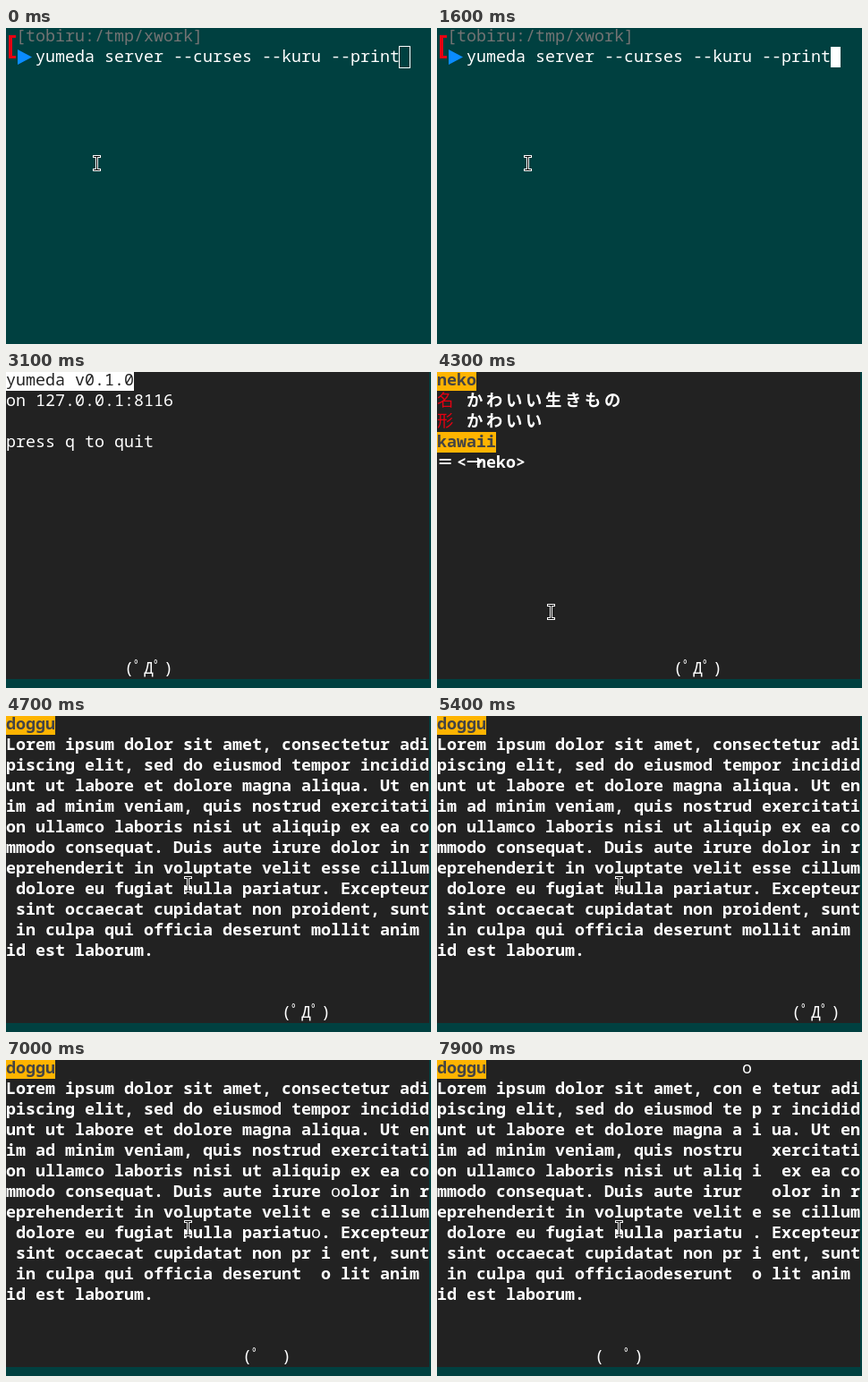
An HTML page with a canvas that plays this animation: 475 by 353 pixels, repeating every 8 s.

```html
<!DOCTYPE html>
<html lang="en">
<head>
<meta charset="utf-8">
<title>Terminal dictionary</title>
<style>
html, body { margin: 0; width: 100%; height: 100%; overflow: hidden; background: #004040; }
canvas { display: block; }
</style>
</head>
<body>
<canvas id="stage" width="475" height="353"></canvas>
<script>
const ctx = document.getElementById('stage').getContext('2d');

const LOOP = 8000, STEP = 100;
const CELL = 11, LINE = 23, TOP = -2, BASE = 17;
const COLS = 43, ROWS = 15, SIZE = 18.33;
const TEAL = '#004040', DARK = '#222222', WHITE = '#ffffff';
const AMBER = '#ffb400', RED = '#e60012', GREY = '#737373', BLUE = '#0a8cff';
const MONO = '"Noto Sans Mono", "Noto Sans CJK JP", "Noto Sans CJK", monospace';
const CJK = '"Noto Sans CJK JP", "Noto Sans CJK", "Noto Sans Mono", sans-serif';

const LOREM = 'Lorem ipsum dolor sit amet, consectetur adipiscing elit, sed do eiusmod tempor ' +
  'incididunt ut labore et dolore magna aliqua. Ut enim ad minim veniam, quis nostrud ' +
  'exercitation ullamco laboris nisi ut aliquip ex ea commodo consequat. Duis aute irure ' +
  'dolor in reprehenderit in voluptate velit esse cillum dolore eu fugiat nulla pariatur. ' +
  'Excepteur sint occaecat cupidatat non proident, sunt in culpa qui officia deserunt ' +
  'mollit anim id est laborum.';

// Faces of one full spin, and the columns where the face fires on its way back
const SPIN = ['(ﾟДﾟ)', '(Дﾟ )', '(ﾟ  )', '(   )', '(  ﾟ)', '( ﾟД)'];
const SHOTS = [31, 29, 19];
const WALL = COLS - 5;

const cellX = col => col * CELL;
const cellY = row => TOP + row * LINE;

function box(x, y, w, h, color) {
  ctx.fillStyle = color;
  ctx.fillRect(x, y, w, h);
}

function fillCells(col, row, count, color) {
  box(cellX(col), cellY(row), count * CELL, LINE, color);
}

function text(str, col, row, color = WHITE, weight = 400) {
  ctx.fillStyle = color;
  for (const ch of str) {
    const wide = /[\u3000-\u9fff\uff01-\uff5e]/.test(ch);
    ctx.font = `${weight} ${SIZE}px ${wide || ch === '→' ? CJK : MONO}`;
    if (ch !== ' ') ctx.fillText(ch, cellX(col), cellY(row) + BASE);
    col += wide ? 2 : 1;
  }
}

function label(str, row, back, color, weight) {
  fillCells(0, row, str.length, back);
  text(str, 0, row, color, weight);
}

function drawShell(t) {
  text('[tobiru:/tmp/xwork]', 1, 0, GREY);
  box(3, 8, 4, 26, RED);
  box(3, 8, 8, 3, RED);
  box(3, 31, 8, 3, RED);
  ctx.fillStyle = BLUE;
  ctx.beginPath();
  ctx.moveTo(13, 24);
  ctx.lineTo(29, 32.5);
  ctx.lineTo(13, 41);
  ctx.fill();
  text('yumeda server --curses --kuru --print', 3, 1);

  if (t < 400) {
    ctx.strokeStyle = WHITE;
    ctx.lineWidth = 1;
    ctx.strokeRect(439.5, 20.5, 12, 24);
  } else if (Math.floor((t - 400) / 600) % 2 === 0) {
    fillCells(40, 1, 1, WHITE);
  }
}

function drawWelcome() {
  label('yumeda v0.1.0', 0, WHITE, DARK);
  text('on 127.0.0.1:8116', 0, 1);
  text('press q to quit', 0, 3);
}

function drawNeko() {
  label('neko', 0, AMBER, '#444444', 700);
  text('名', 0, 1, RED);
  text('かわいい生きもの', 3, 1, WHITE, 700);
  text('形', 0, 2, RED);
  text('かわいい', 3, 2, WHITE, 700);
  label('kawaii', 3, AMBER, '#444444', 700);
  text('＝<→neko>', 0, 4, WHITE, 700);
}

function drawDoggu() {
  label('doggu', 0, AMBER, '#444444', 700);
  for (let i = 0; i * COLS < LOREM.length; i++) {
    text(LOREM.slice(i * COLS, (i + 1) * COLS), 0, i + 1, WHITE, 700);
  }
}

// Moves made by the face after n steps; it hurries once and stalls twice
function moves(n) {
  return n - 19 + (n > 48) - (n === 69) - (n > 71);
}

function drawFace(k) {
  if (k < 0) return;
  const back = Math.max(0, k - WALL);
  const col = k - 2 * back;

  for (const shot of SHOTS) {
    const age = shot - col;
    if (!back || age < 0) continue;
    const row = ROWS - 2 - age;
    for (let r = Math.max(0, row); r < ROWS - 1; r++) fillCells(shot + 2, r, 1, DARK);
    if (row >= 0) text('o', shot + 2, row);
  }
  text(SPIN[back % SPIN.length], col, ROWS - 1);
}

function drawPointer(x, y) {
  const beam = (grow, color) => {
    const bar = 1 + 2 * grow;
    box(x - 3 - grow, y - 8 - grow, 6 + bar, bar, color);
    box(x - 3 - grow, y + 7 - grow, 6 + bar, bar, color);
    box(x - grow, y - 8, bar, 16, color);
  };
  beam(1, WHITE);
  beam(0, '#000000');
}

function pointer(n) {
  if (n < 25) return [101, 151];
  if (n < 42) return null;
  if (n < 44) return [127 + (n - 43) * 62, 268 - (n - 43) * 62];
  return [203, 188];
}

function draw(t) {
  const n = Math.floor(t / STEP);
  box(0, 0, 475, 353, TEAL);
  if (n < 18) {
    drawShell(t);
  } else {
    box(0, 0, COLS * CELL, cellY(ROWS), DARK);
    if (n < 33) drawWelcome();
    else if (n < 44) drawNeko();
    else drawDoggu();
    drawFace(moves(n));
  }
  const p = pointer(n);
  if (p) drawPointer(p[0], p[1]);
}

const start = performance.now();
function loop() {
  draw((performance.now() - start) % LOOP);
  requestAnimationFrame(loop);
}
loop();
</script>
</body>
</html>
```
